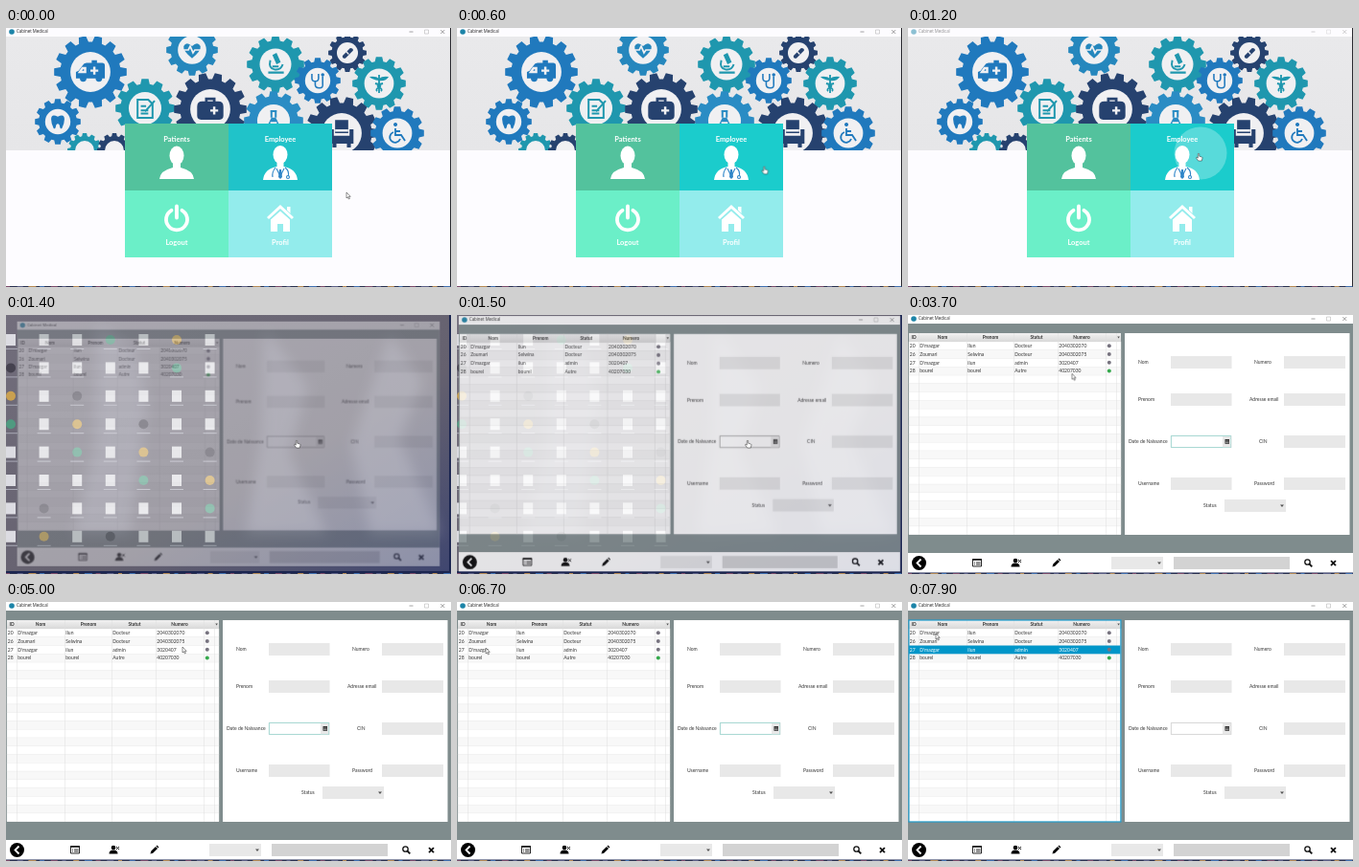
Animation, 464 px wide and 271 px high, one loop 8 s. Source, as an HTML page:

```html
<!DOCTYPE html>
<html lang="fr">
<head>
<meta charset="utf-8">
<title>Cabinet Medical</title>
<style>
html, body { margin: 0; width: 100%; height: 100%; overflow: hidden; background: #fff; }
svg { display: block; width: 100vw; height: 100vh; }
text { font: 5px Lato, sans-serif; fill: #333; }
.title { font: 4.4px "Open Sans", sans-serif; fill: #222; }
.head { font-weight: 700; font-size: 4.8px; text-anchor: middle; }
.tile { font-weight: 700; font-size: 7.5px; fill: #fff; text-anchor: middle; }
.field { fill: #e8e8e8; }

#home, #app, #hover, #ripple, #dim, #focus, #pick, .arrow, .hand {
  animation: 8s step-end infinite;
}
#home { animation-name: home; }
#app { animation-name: app; transform-origin: 232px 135.5px; }
#hover { animation-name: hover; }
#ripple { animation-name: ripple; transform-origin: 305px 131px; }
#dim { animation-name: dim; }
#focus { animation-name: focus; }
#pick { animation-name: pick; }
.hand { animation-name: hand; }
.arrow { animation-name: arrow; }
#cursor { animation: move 8s infinite; }

@keyframes home { 0% { visibility: visible } 17.5%, 100% { visibility: hidden } }
@keyframes app {
  0% { opacity: 0 }
  17.5% { opacity: .4; transform: scale(.95) }
  18.75% { opacity: .82; transform: scale(.992) }
  20%, 100% { opacity: 1; transform: none }
}
@keyframes hover { 0% { opacity: 0 } 5%, 100% { opacity: 1 } }
@keyframes ripple {
  0% { transform: scale(0) }
  12.5% { transform: scale(.3) }
  13.75% { transform: scale(.68) }
  15%, 100% { transform: none }
}
@keyframes dim { 0% { opacity: 1 } 15%, 100% { opacity: .5 } }
@keyframes focus { 0% { stroke: #999 } 20% { stroke: #8fd0c8 } 87.5%, 100% { stroke: #d0d0d0 } }
@keyframes pick { 0% { opacity: 0 } 87.5%, 100% { opacity: 1 } }
@keyframes hand { 0% { opacity: 0 } 5% { opacity: 1 } 20%, 100% { opacity: 0 } }
@keyframes arrow { 0% { opacity: 1 } 5% { opacity: 0 } 20%, 100% { opacity: 1 } }
@keyframes move {
  0% { transform: translate(355px, 172px); animation-timing-function: steps(9) }
  11.25% { transform: translate(303px, 131px); animation-timing-function: step-end }
  18.75% { transform: translate(303px, 131px); animation-timing-function: steps(7) }
  27.5% { transform: translate(7px, 51px); animation-timing-function: steps(2) }
  30% { transform: translate(10px, 57px); animation-timing-function: steps(7) }
  38.75% { transform: translate(75px, 62px); animation-timing-function: steps(9) }
  50% { transform: translate(219px, 61px); animation-timing-function: steps(9) }
  61.25% { transform: translate(206px, 52px); animation-timing-function: step-end }
  62.5% { transform: translate(184px, 47px); animation-timing-function: steps(8) }
  72.5% { transform: translate(216px, 46px); animation-timing-function: steps(4) }
  77.5% { transform: translate(140px, 31px); animation-timing-function: steps(5) }
  83.75% { transform: translate(30px, 48px); animation-timing-function: step-end }
  95% { transform: translate(30px, 48px); animation-timing-function: steps(3) }
  98.75%, 100% { transform: translate(29px, 33px) }
}
</style>
</head>
<body>
<svg viewBox="0 0 464 271">
  <defs>
    <linearGradient id="wall" x2="1" y2="1">
      <stop stop-color="#726e7c"/><stop offset=".6" stop-color="#65616f"/><stop offset="1" stop-color="#3f4670"/>
    </linearGradient>
    <linearGradient id="banner" x2="0" y2="1">
      <stop stop-color="#e9e9eb"/><stop offset="1" stop-color="#e6e6e8"/>
    </linearGradient>
    <linearGradient id="header" x2="0" y2="1">
      <stop stop-color="#f1f1f1"/><stop offset="1" stop-color="#d9d9d9"/>
    </linearGradient>
    <clipPath id="top"><path d="M0 9h464v119H0z"/></clipPath>
    <clipPath id="staff"><path d="M232 100h108v70H232z"/></clipPath>
    <filter id="soft"><feGaussianBlur stdDeviation="7"/></filter>
    <g id="buttons" fill="none" stroke="#444" stroke-width=".5">
      <path d="M420.500 4h4M453.300 2l4 4m0-4l-4 4"/><path d="M436.500 2h4v4h-4z" stroke="#aaa"/>
    </g>
    <g id="caption">
      <circle cx="6" cy="4" r="2.800" fill="#1c84a8"/>
      <text class="title" x="11" y="5.400">Cabinet Medical</text>
    </g>
  </defs>

  <g id="desk">
    <path fill="url(#wall)" d="M0 0h464v271H0z"/>
    <g filter="url(#soft)" fill="#a5a6b8" opacity=".35">
      <path d="M95 10l40 25 12 60-18 135H70l22-90z"/>
      <path d="M270 15l45 60-20 70 40 85h-85l15-95z"/>
      <path d="M400 20l35 50-25 60 45 100h-75l-20-95z"/>
    </g>
    <g id="files"></g>
    <path fill="#1b2550" d="M0 268h464v3H0zM462 0h2v271h-2z"/>
  </g>

  <g id="home">
    <path fill="#fdfcff" d="M0 0h464v271H0z"/>
    <g id="dim"><use href="#caption"/><use href="#buttons"/></g>
    <path fill="url(#banner)" d="M0 9h464v119H0z"/>
    <g id="gears" clip-path="url(#top)"></g>
    <path fill="#53c29d" d="M124 100h108v70H124z"/>
    <path fill="#20c3c9" d="M232 100h108v70H232z"/>
    <path fill="#6befc8" d="M124 170h108v70H124z"/>
    <path fill="#93ecec" d="M232 170h108v70H232z"/>
    <path id="hover" fill="#1bcccc" d="M232 100h108v70H232z"/>
    <g clip-path="url(#staff)"><circle id="ripple" cx="305" cy="131" r="27.500" fill="#fff" opacity=".27"/></g>
    <text class="tile" x="178" y="119">Patients</text>
    <text class="tile" x="286" y="119">Employee</text>
    <text class="tile" x="178" y="226.500">Logout</text>
    <text class="tile" x="286" y="226.500">Profil</text>
    <g fill="#fff">
      <ellipse cx="178" cy="133.500" rx="7.500" ry="10"/>
      <path d="M174 140h8v6q13 3 14 12h-36q1-9 14-12z"/>
      <ellipse cx="286" cy="132.500" rx="7.500" ry="9.500"/>
      <path d="M282.500 139h7v6q13 2 14.500 14h-36q1.500-12 14.500-14z"/>
      <path d="M286 185l14 13-2 2-12-11-12 11-2-2z"/>
      <path d="M293 187h3.500v7l-3.500-3.500zM286 191.500l10 9v12.500h-7v-8h-6v8h-7v-12.500z"/>
    </g>
    <path d="M172.500 190.800a11 11 0 1 0 11 0M178 186.500v12" fill="none" stroke="#fff" stroke-width="3.800" stroke-linecap="round"/>
    <g fill="none" stroke="#2f86c8" stroke-width="1.100">
      <path d="M281 146q-4 5-3 10m13-10q5 4 3 9M282 147l4 8 4-8"/>
      <circle cx="294" cy="156" r="1.500"/>
    </g>
    <path fill="#2f86c8" d="M285 148h2l1 8-2 2-2-2z"/>
    <path fill="#2a2a30" d="M463 0h1v271h-1z"/>
  </g>

  <g id="app">
    <path fill="#fff" d="M0 0h464v269.500H0z"/>
    <use href="#caption"/><use href="#buttons"/>
    <path fill="#7f8c8d" d="M0 9h464v240H0z"/>
    <path fill="#fff" d="M226 19h234.500v211H226z"/>
    <g id="table"></g>
    <g id="form"></g>
    <path id="focus" fill="#fff" stroke-width=".8" d="M274.400 126.400h62.200v12.200h-62.200z"/>
    <path class="field" d="M328 127h8.300v11.300H328z"/>
    <path fill="#333" d="M330.500 130h4.500v4.800h-4.500z"/>
    <path stroke="#ddd" stroke-width=".5" d="M331 132h3.500M331 133.500h3.500"/>
    <path class="field" d="M330 193h64v13h-64zM212 253h54v13h-54z"/>
    <path fill="#555" d="M388 198.500h4l-2 2.500zM260 258.500h4l-2 2.500z"/>
    <path fill="#d3d3d3" d="M277 253h121v13H277z"/>
    <circle cx="11.500" cy="259.500" r="7.500"/>
    <path d="M13.500 255.500l-4 4 4 4" fill="none" stroke="#fff" stroke-width="1.800"/>
    <path fill="none" stroke="#111" stroke-width=".9" d="M67.500 255.500h9v7.500h-9zM69 259h1m1 0h4.500M69 261h1m1 0h4.500"/>
    <path stroke="#111" stroke-width="1.600" d="M67.200 256h9.600"/>
    <circle cx="112" cy="257" r="2.300"/>
    <path d="M107.500 263.500q0-4 4.500-4t4.500 4z"/>
    <path d="M115 256l3 3m0-3l-3 3" stroke="#111"/>
    <path d="M150.500 263.500l.7-2.700 4.800-4.800 2 2-4.800 4.800zM156.600 255.400l.8-.8 2 2-.8.8z"/>
    <g fill="none" stroke="#111">
      <circle cx="416.500" cy="258.500" r="2.700" stroke-width="1.300"/>
      <path d="M418.500 260.500l2.800 2.800" stroke-width="1.800"/>
      <path d="M441 257.200l5 5m0-5l-5 5" stroke-width="1.800"/>
    </g>
  </g>

  <g id="bar"></g>

  <g id="cursor" stroke="#222" stroke-width=".5" fill="#fff">
    <path class="arrow" d="M0 0v6l1.400-1.200 1 2.200 1-.5-1-2.100H4.200z"/>
    <path class="hand" d="M-.7.600q.7-1 1.400 0v2.600l2.700.8q.7.400.5 1.300L3.300 8H-.3l-2.200-3q0-1 1-.6l.8.700z"/>
  </g>
</svg>

<script>
const put = (id, html) => { document.getElementById(id).innerHTML = html; };
const rect = (x, y, w, h, rest) => `<rect x="${x}" y="${y}" width="${w}" height="${h}" ${rest}/>`;
const label = (x, y, s, rest = "") => `<text x="${x}" y="${y}" ${rest}>${s}</text>`;
const range = n => [...Array(n).keys()];

// Each icon: solid shape, cut-out lines, drawn lines, in a box from -10 to 10.
const icons = {
  van: ["M-11 5V0l2-1 3-4q1-2 3-2H9q2 0 2 2V5zM-8 5a2.500 2.500 0 1 0 5 0zM4 5a2.500 2.500 0 1 0 5 0zM1-9h4v2H1z", "M3-4v6M0-1h6M-8 0l2-3h2v3z"],
  heart: ["M0 9Q-10 1-9-4Q-6-10 0-4Q6-10 9-4Q10 1 0 9z", "M-9 0h5l2-4 3 7 2-3h6"],
  scope: ["M-3-9l4-2 4 9-4 2zM-7 7H8v2H-7z", "", "M-5-4q-2 8 4 9t8-5M-3 2h6"],
  pill: ["M-7 4L4-7q5 0 4 4L-3 8q-5 0-4-4z", "M-2-2l4 4"],
  steth: ["M6-5a2 2 0 1 1 .1 0z", "", "M-7-8v5q0 4 4 4t4-4v-5M-3 1v4q0 4 5 4t4-5v-9"],
  staff: ["M-10-7q7-1 10 2q3-3 10-2q-3 5-10 4t-10-4z", "", "M0-9V10M-4 0q8 2 4 4t-2 4M4 0q-8 2-4 4t2 4"],
  tooth: ["M0-6Q8-10 8-3Q8 2 5 8Q3 10 2 4Q0 1-2 4Q-3 10-5 8Q-8 2-8-3Q-8-10 0-6z", ""],
  note: ["", "", "M-7-8H3l4 4V9H-7zM-4-2h5M-4 2h7M-4 5h7M0 3l9-10"],
  bag: ["M-10-2q0-4 4-4H6q4 0 4 4V5q0 3-3 3H-7q-3 0-3-3zM-4-9H4v3H2v-1h-4v1h-2z", "M3-2v6M0 1h6"],
  flask: ["M-2-3h4l5 10q0 2-2 2H-5q-2 0-2-2z", "M-3 2h6", "M-2-9v6M2-9v6M-3-9h6"],
  seat: ["M-5-10H5V0H-5zM-9-3h3V2H6v-5h3V8H-9zM-7 8h3v3h-3zM4 8h3v3H4z", "M-5-2H5"],
  chair: ["M-2-7a2 2 0 1 1 .1 0z", "", "M-2-5v7h6l4 6M-2-2h5M-4-1a5.500 5.500 0 1 0 7 7"]
};

function gear([x, y, r, color, name]) {
  const n = r > 32 ? 14 : 12, pts = [];
  range(n).forEach(i => [[-.36, .83], [-.22, 1], [.22, 1], [.36, .83]].forEach(([o, k]) => {
    const a = (i + o) / n * Math.PI * 2;
    pts.push((Math.cos(a) * r * k).toFixed(1) + "," + (Math.sin(a) * r * k).toFixed(1));
  }));
  const [solid, cut, line = ""] = icons[name] || ["", ""];
  return `<g transform="translate(${x} ${y})"><polygon points="${pts}" fill="${color}"/>
    <circle r="${r * .55}" fill="#f0f0f2"/>
    <g transform="scale(${r * .036})" fill="none" stroke-width="1.800">
      <path d="${solid}" fill="${color}"/><path d="${cut}" stroke="#f0f0f2"/><path d="${line}" stroke="${color}"/>
    </g></g>`;
}

const blue = "#2079bd", teal = "#1f97ae", navy = "#26426f";
put("gears", [
  [82, 128, 18, teal], [113, 128, 18, navy],
  [88, 46, 38, blue, "van"], [194, 23, 27, "#2587bd", "heart"],
  [281, 38, 30, teal, "scope"], [356, 26, 20, navy, "pill"],
  [325, 55, 24, blue, "steth"], [389, 58, 28, teal, "staff"],
  [54, 98, 24, blue, "tooth"], [145, 84, 31, teal, "note"],
  [279, 97, 31, "#2a8cc4", "flask"], [350, 110, 38, navy, "seat"],
  [213, 85, 38, navy, "bag"], [408, 110, 28, blue, "chair"]
].map(gear).join(""));

const cols = [0.5, 11, 61, 110, 156, 206, 217], rowH = 8.77;
const people = [
  ["20", "D'mazgar", "Ilun", "Docteur", "2040302070"],
  ["26", "Zoumari", "Selwina", "Docteur", "2040302075"],
  ["27", "D'mazgar", "ilun", "admin", "3020407"],
  ["28", "bourel", "bourel", "Autre", "40207030"]
];
const rowText = (p, i, rest) =>
  p.map((s, c) => label(cols[c] + 1.300, 34 + i * rowH, s, rest)).join("");

put("table",
  rect(1, 19, 221, 211, 'fill="#fff"') +
  range(23).map(i => rect(1, 28 + i * rowH, 221, rowH,
    `fill="${i % 2 ? "#f8f8f8" : "#fff"}" stroke="#e9e9e9" stroke-width=".4"`)).join("") +
  rect(1, 19, 221, 9, 'fill="url(#header)"') +
  cols.slice(1).map(x => rect(x, 19, .5, 211, 'fill="#dedede"')).join("") +
  ["ID", "Nom", "Prenom", "Statut", "Numero"].map((s, i) =>
    label([6, 36, 86, 134, 181][i], 25.300, s, 'class="head"')).join("") +
  '<path fill="#555" d="M218.300 22.500h2.600l-1.300 2z"/>' +
  people.map((p, i) => rowText(p, i)).join("") +
  `<g id="pick">${rect(1, 28 + 2 * rowH, 220.500, rowH, 'fill="#0096c9"')}
    ${rowText(people[2], 2, 'style="fill:#fff"')}
    ${rect(.9, 19, 221, 211, 'fill="none" stroke="#1f9bcb" stroke-width="1.200"')}</g>` +
  people.map((p, i) => `<circle cx="209.800" cy="${32.300 + i * rowH}" r="2"
    fill="${i < 3 ? "#77737f" : "#35a94c"}"/>`).join(""));

const lines = [
  [43, "Nom", 240, "Numero", 361], [82, "Prenom", 240, "Adresse email", 356],
  [126, "Date de Naissance", 230, "CIN", 366], [170, "Username", 240, "Password", 361]
];
put("form", lines.map(([y, a, ax, b, bx]) =>
  label(ax, y + 8.200, a) + label(bx, y + 8.200, b) +
  rect(274, y, 63.500, 13, 'class="field"') + rect(392, y, 64, 13, 'class="field"')).join("") +
  label(308, 201, "Status"));

put("files", range(56).map(i => {
  const x = i % 7 * 34.600, y = 20 + (i / 7 | 0) * 29.400, k = i * 5 % 9;
  const hue = ["#4f9a80", "#c9a050", "#45424f"][k % 3];
  return (k < 6 ? rect(x, y, 10, 12, 'fill="#dcdce2"') : `<circle cx="${x + 5}" cy="${y + 6}" r="5" fill="${hue}"/>`) +
    rect(x - 2, y + 15, 14, 1, 'fill="#a9a9b6"');
}).join(""));

put("bar", rect(0, 270, 464, 1, 'fill="#29304f"') +
  range(40).map(i => rect(i * 11.700, 270, 4 + i * 7 % 5, 1,
    `fill="${["#7a4a6a", "#3f6fb0", "#b58a55", "#5b5f86"][i * 3 % 4]}"`)).join(""));
</script>
</body>
</html>
```
